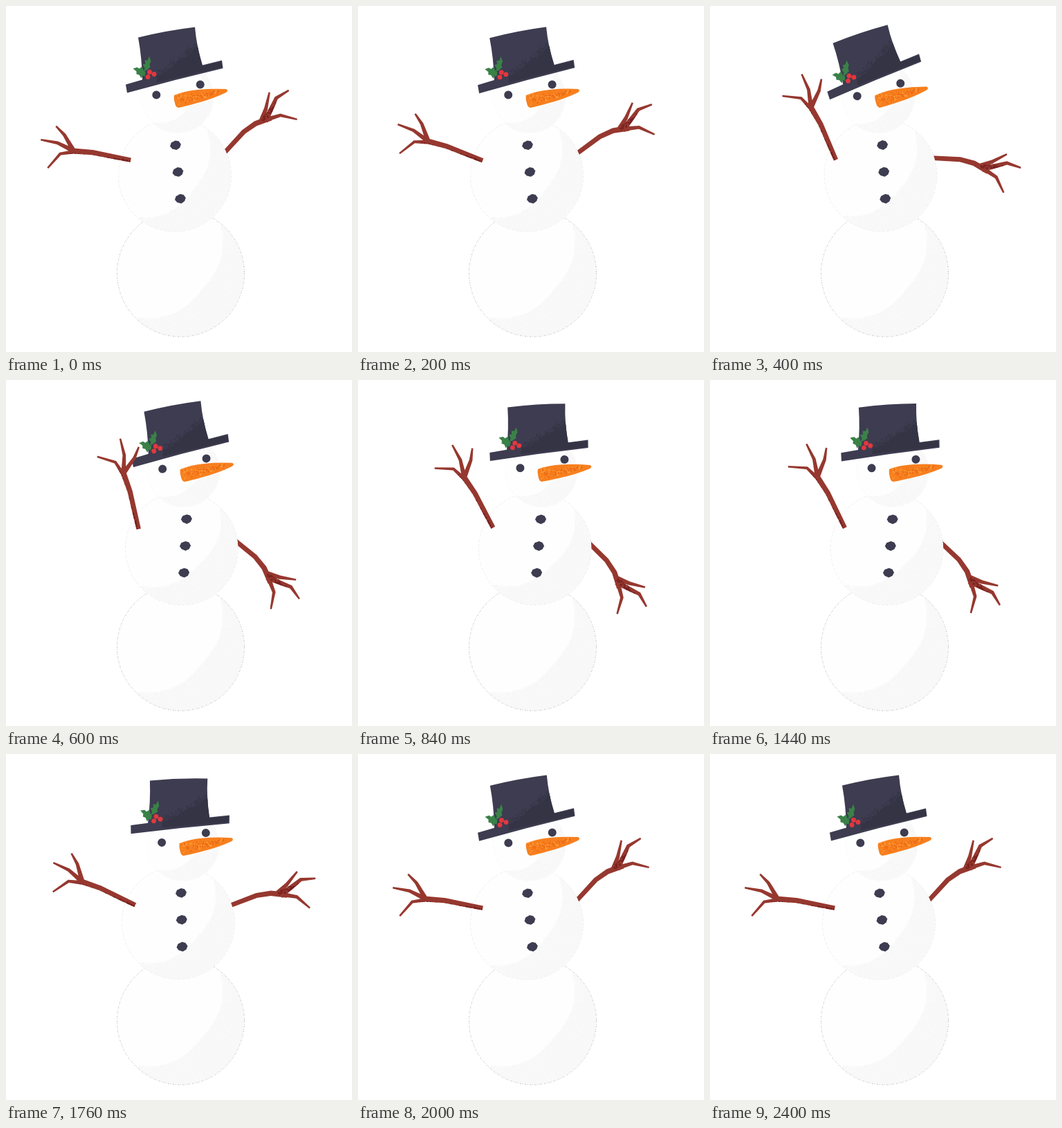
Animation, 500 px wide and 500 px high, one loop 2.44 s. Source, as an HTML page with a canvas:

```html
<!DOCTYPE html>
<html lang="en">
<head>
<meta charset="utf-8">
<title>Waving snowman</title>
<style>
  html, body { margin: 0; width: 100%; height: 100%; overflow: hidden; background: #fff; }
  canvas { display: block; width: 500px; height: 500px; }
</style>
</head>
<body>
<canvas id="stage"></canvas>
<script>
const LOOP = 2440, STEP = 40;
const INK = '#3d3c50', INK_SHADE = '#353445';
const canvas = document.getElementById('stage');
const ctx = canvas.getContext('2d');
const dpr = window.devicePixelRatio || 1;
canvas.width = canvas.height = 500 * dpr;

// ---- Motion ----
function ease(t, from, to) {
  const u = Math.min(1, Math.max(0, (t - from) / (to - from)));
  return u * u * (3 - 2 * u);
}
const sin2 = u => Math.sin(Math.PI * u) ** 2;
const pulse = (t, from, to) => t > from && t < to ? sin2((t - from) / (to - from)) : 0;

// Arms lead, the body follows, head and hat drag behind; two waves in between.
function poseAt(t) {
  const raise = (a, b, c, d) => ease(t, a, b) - ease(t, c, d);
  const lean = raise(290, 620, 1520, 2000);
  const wave = pulse(t, 600, 1120) + pulse(t, 1120, 1640);
  const dragBack = pulse(t, 1560, 1960);
  const dragHead = pulse(t, 180, 640);
  return {
    body: -4 + 8 * lean + 1.5 * wave,
    headX: 249 + 9.5 * lean + 8 * wave - 7.5 * dragHead + 3.2 * dragBack,
    head: 2.5 * wave - 3 * dragHead + dragBack,
    hat: 4.2 * lean + 2.6 * wave - 9.8 * pulse(t, 150, 740) + 6.2 * dragBack - 1.5 * pulse(t, 1960, 2300),
    left: 65.7 * raise(100, 500, 1440, 1900) - 15 * wave,
    right: 92 * raise(64, 695, 1400, 1958)
  };
}

// ---- Shapes ----
let seed = 7;
function rnd() {
  seed = (seed * 16807) % 2147483647;
  return seed / 2147483647;
}
const spread = () => rnd() + rnd() - 1;

function dot(path, x, y, r) {
  path.moveTo(x + r, y);
  path.arc(x, y, r, 0, 7);
}
function dots(n, size, place) {
  const p = new Path2D();
  for (let i = 0; i < n; i++) dot(p, ...place(rnd()), size * (.4 + rnd() * .6));
  return p;
}

// Tapered twig through a few points.
function twig(path, w0, w1, ...pts) {
  const last = pts.length - 1, back = [];
  pts.forEach(([x, y], i) => {
    const [ax, ay] = pts[Math.max(0, i - 1)], [bx, by] = pts[Math.min(last, i + 1)];
    const w = (w0 + (w1 - w0) * i / last) / 2 / Math.hypot(bx - ax, by - ay);
    const nx = (ay - by) * w, ny = (bx - ax) * w;
    i ? path.lineTo(x + nx, y + ny) : path.moveTo(x + nx, y + ny);
    back.unshift([x - nx, y - ny]);
  });
  back.forEach(([x, y]) => path.lineTo(x, y));
  path.closePath();
}

// Arms, relative to the shoulder.
const leftArm = new Path2D();
twig(leftArm, 6.5, 8, [3, .5], [-52, -10.5], [-83, -13]);
twig(leftArm, 7, 2.5, [-78, -12], [-103, -24.5], [-127, -29]);
twig(leftArm, 7, 2.5, [-79, -12], [-93, -36], [-105, -48.5]);
twig(leftArm, 6, 2.5, [-76, -12], [-99, -8.5], [-117, 12]);
const leftBark = dots(90, 1.3, u => [-88 + u * 90, -9 + u * 11 + spread() * 2]);

const rightArm = new Path2D();
twig(rightArm, 6.5, 8, [-2, 4], [33, -34], [50, -46], [72, -54]);
twig(rightArm, 8, 2.5, [58, -48], [65, -68], [70, -91]);
twig(rightArm, 8, 2.5, [64, -49], [80, -83], [98, -94]);
twig(rightArm, 7, 2.5, [60, -50], [86, -58], [110, -52]);
const rightBark = dots(80, 1.3, u => [60 + u * 22 + spread() * 3, -50 - u * 26 + spread() * 4]);

// Crescent shade with a crumbly inner edge, plus pale grain.
function shadeOf(r) {
  const inner = a => .42 + .55 * ((a - .73) / 1.6) ** 2;
  const p = new Path2D();
  p.arc(0, 0, r - .5, -.87, 2.33);
  for (let a = 2.33; a > -.87; a -= 1.2 / r) {
    const d = r * Math.min(.99, inner(a) + spread() * .025);
    p.lineTo(Math.cos(a) * d, Math.sin(a) * d);
  }
  p.closePath();
  const grain = dots(Math.round(r * 4), 1, u => {
    const a = -.8 + u * 3.05, k = inner(a), d = r * (k + (.97 - k) * rnd());
    return [Math.cos(a) * d, Math.sin(a) * d];
  });
  return [p, grain];
}
const shades = {};
function ball(x, y, r, line) {
  const [shade, grain] = shades[r] || (shades[r] = shadeOf(r));
  ctx.save();
  ctx.translate(x, y);
  ctx.beginPath();
  ctx.arc(0, 0, r, 0, 7);
  fill('#fefefe');
  fill('#f8f8f8', shade);
  fill('#fbfbfb', grain);
  ctx.lineWidth = .6;
  ctx.strokeStyle = line;
  ctx.setLineDash([2, 2.5, 1, 1.5]);
  ctx.stroke();
  ctx.restore();
}

const button = new Path2D('M-8 1L-6-4L0-6.8L5-5.5L8-1L6 4L1 7L-5 5Z');
const nose = new Path2D('M-6 8Q8 2 28 0Q48-2 69-1Q73 1 69 4Q48 14 24 20Q10 24 0 26Q-4 25-5 19Q-7 12-6 8Z');
const noseAt = u => [-2 + u * 60, 15 - u * 12 + spread() * 10 * (1 - u * .75)];
const noseLight = dots(50, 1.6, noseAt);
const noseDark = dots(60, 1.4, noseAt);

const hat = new Path2D('M-52.5-56Q-12-66 29.5-71Q32-42 40.5-16L68.5-23L70-11.5Q0 5-68.5 24L-70.5 12L-46.5 5Q-47-26-52.5-56Z');
const hatShade = new Path2D('M34-46Q27-35 16-28Q3-24-4-12Q-14-4-25 0L-26 9L69-13L68-21L40-15Z');
const hatGrain = dots(150, 1.2, u => [33 - u * 58 + spread() * 6, -44 + u * 43 + spread() * 7]);
const leaves = new Path2D('M-36.5-29L-34-22L-36-17L-35-13L-40-9L-44-7L-43-12L-46-17L-42-18L-43-23L-39-23Z'
  + 'M-60-11L-54-13L-51-11L-47-14L-45-9L-42-6L-43 0L-46-1L-48 3L-51-2L-55-3L-55-7Z');
const berries = new Path2D();
for (const [x, y] of [[-36, -6], [-38.5, 1], [-29.5, -3]]) dot(berries, x, y, 3.4);
const eyes = new Path2D();
for (const s of [-1, 1]) dot(eyes, 31.7 * s, -7.5 * s, 6);

// ---- Drawing ----
function fill(color, path) {
  ctx.fillStyle = color;
  path ? ctx.fill(path) : ctx.fill();
}
function at(x, y, deg, draw) {
  ctx.save();
  ctx.translate(x, y);
  ctx.rotate(deg * Math.PI / 180);
  draw();
  ctx.restore();
}
// Fills a shape, then its texture clipped to it.
function textured(shape, color, textureColor, ...textures) {
  ctx.save();
  fill(color, shape);
  ctx.clip(shape);
  textures.forEach(p => fill(textureColor, p));
  ctx.restore();
}
// Inside, coordinates are those of the upright body.
const onBody = (deg, draw) => at(254.5, 316, deg, () => {
  ctx.translate(-254.5, -316);
  draw();
});
const arm = (x, y, deg, shape, bark) =>
  at(x, y, deg, () => textured(shape, '#96382f', '#74201f', bark));

function drawHat() {
  textured(hat, INK, INK_SHADE, hatShade, hatGrain);
  fill('#3a8148', leaves);
  fill('#e2383f', berries);
}
function drawHead() {
  ball(-1, 10.5, 52, 'rgba(0,0,0,.07)');
  fill(INK, eyes);
  textured(nose, '#f77f1e', '#fb9a35', noseLight);
  fill('#ec6a14', noseDark);
}

function draw(t) {
  const p = poseAt(t);
  ctx.setTransform(dpr, 0, 0, dpr, 0, 0);
  ctx.fillStyle = '#fff';
  ctx.fillRect(0, 0, 500, 500);

  onBody(p.body, () => arm(317.5, 220, p.right - p.body, rightArm, rightBark));
  ball(252.5, 386, 92, 'rgba(0,0,0,.4)');
  onBody(p.body, () => {
    ball(249, 244, 81.5, 'rgba(0,0,0,.16)');
    for (let i = 0; i < 3; i++)
      at(253 + i * .75, 200.8 + i * 38.8, 0, () => fill(INK, button));
  });
  at(p.headX, 121, p.head, () => {
    drawHead();
    at(-5.5, -19.5, p.hat - p.head, drawHat);
  });
  onBody(p.body, () => arm(184, 217, p.left - p.body, leftArm, leftBark));
}

const start = performance.now();
function tick() {
  const t = Math.max(0, performance.now() - start) % LOOP;
  draw(Math.floor(t / STEP) * STEP);
  requestAnimationFrame(tick);
}
tick();
</script>
</body>
</html>
```
